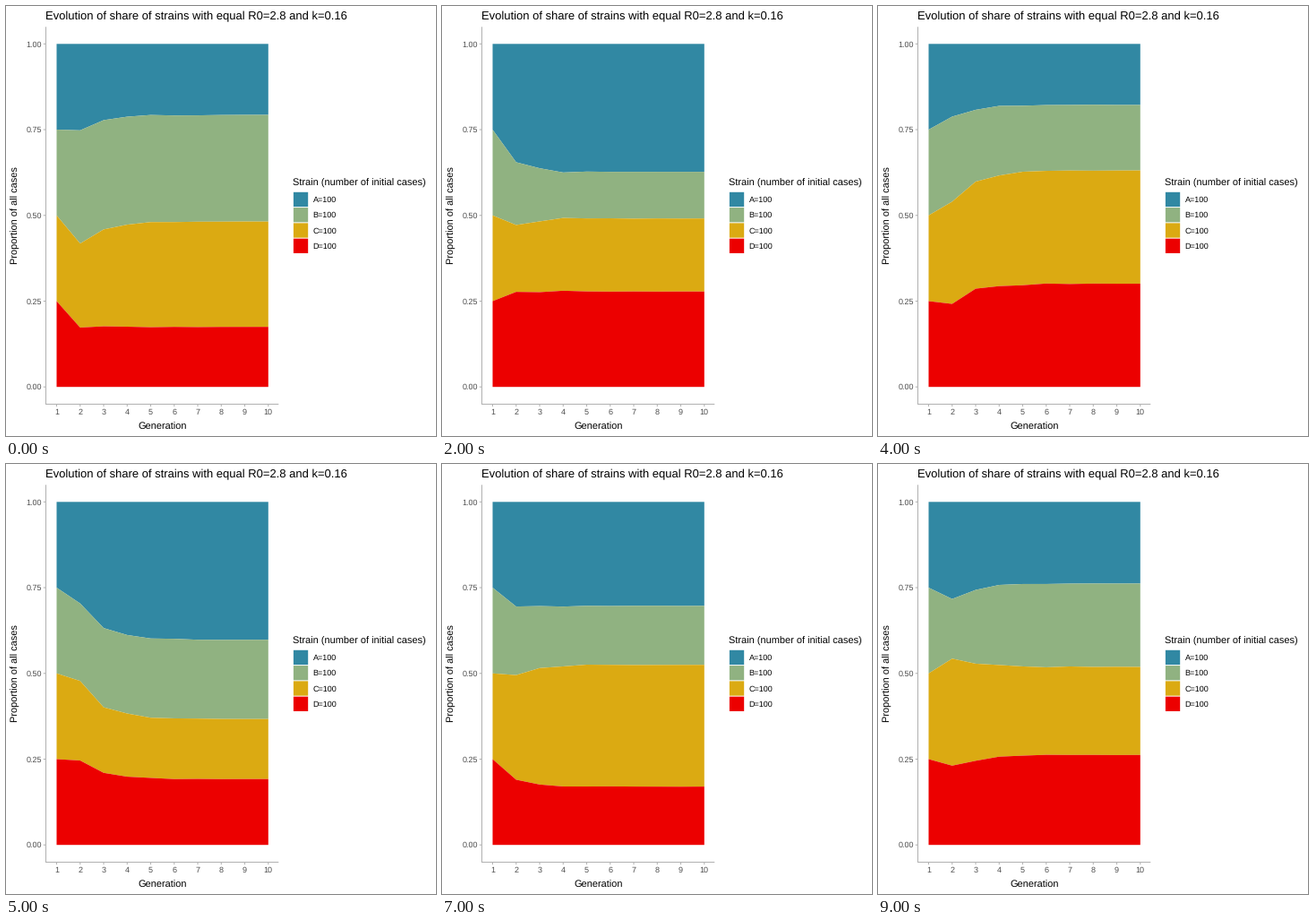
Write a matplotlib script that moves like this. It is 480x480 px and loops after 10 s.

```python
import numpy as np
import matplotlib.pyplot as plt
from matplotlib.animation import FuncAnimation
from matplotlib.patches import Polygon, Rectangle

plt.rcParams["font.family"] = "Liberation Sans"
plt.rcParams["text.hinting"] = "none"
plt.rcParams["text.hinting_factor"] = 1

SIZE, DPI = 480, 100
PX = 72 / DPI
COLORS = ["#3188A3", "#90B281", "#DBAA12", "#EC0000"]
STRAINS = "ABCD"
GENS = np.arange(1, 11)
START = np.array([0.75, 0.50, 0.25])
DECAY, WOBBLE = 0.35, 0.006
KEY = 17.28

# Per run: the three band limits in generation 2, then where they settle
RUNS = [
    ((0.748, 0.418, 0.173), (0.793, 0.482, 0.175)),
    ((0.715, 0.490, 0.240), (0.705, 0.480, 0.232)),
    ((0.655, 0.472, 0.277), (0.627, 0.491, 0.278)),
    ((0.634, 0.446, 0.213), (0.680, 0.463, 0.187)),
    ((0.788, 0.540, 0.242), (0.822, 0.631, 0.301)),
    ((0.704, 0.478, 0.246), (0.598, 0.367, 0.192)),
    ((0.735, 0.505, 0.240), (0.771, 0.500, 0.230)),
    ((0.695, 0.495, 0.190), (0.697, 0.525, 0.170)),
    ((0.735, 0.505, 0.245), (0.722, 0.500, 0.235)),
    ((0.717, 0.543, 0.231), (0.762, 0.519, 0.262)),
]


def x_px(gen):
    return 56.5 + (gen - 1) * 236.3 / 9


def y_px(share):
    return 425.2 - 382.9 * share


def limits(run):
    """Shares jump once, then close in on their end with fading noise."""
    second, settled = np.array(RUNS[run])
    rng = np.random.default_rng(run)
    lines = [np.ones(3), START, second]
    for step in range(1, 9):
        noise = WOBBLE * 0.6 ** step * rng.standard_normal(3)
        lines.append(settled + (second - settled) * DECAY ** step + noise)
    inner = np.array(lines[1:]).T
    return [np.ones(10), *inner, np.zeros(10)]


fig = plt.figure(figsize=(SIZE / DPI, SIZE / DPI), dpi=DPI, facecolor="white")
ax = fig.add_axes([0, 0, 1, 1])
ax.set_xlim(0, SIZE)
ax.set_ylim(SIZE, 0)
ax.axis("off")


def label(x, y, text, size, color="black", **kw):
    ax.text(x, y, text, fontsize=size * PX, color=color, va="baseline", **kw)


def rule(xs, ys):
    ax.plot(xs, ys, color="#B3B3B3", lw=1.07 * PX, solid_capstyle="butt",
            snap=False)


bands = [ax.add_patch(Polygon([(0, 0)] * 3, fc=c, ec="none", lw=0))
         for c in COLORS]

rule([44.5, 44.5], [23.3, 445])
rule([44, 304.3], [444.5, 444.5])
for share in np.linspace(0, 1, 5):
    y = y_px(share)
    rule([41.8, 44.5], [y, y])
    label(39.7, y + 3.2, f"{share:.2f}", 8.8, "#4D4D4D", ha="right")
for gen in GENS:
    x = x_px(gen)
    rule([x, x], [444.5, 447.2])
    label(x, 456, str(gen), 8.8, "#4D4D4D", ha="center")

label(44.5, 15, "Evolution of share of strains with equal R0=2.8 and k=0.16", 13.4)
label(174.7, 473, "Generation", 11, ha="center")
label(13.8, 234, "Proportion of all cases", 11, ha="center",
      rotation=90, rotation_mode="anchor")

label(320.3, 201, "Strain (number of initial cases)", 11)
for i, (name, color) in enumerate(zip(STRAINS, COLORS)):
    top = 207.3 + KEY * i
    ax.add_patch(Rectangle((320.9, top + 0.5), KEY - 1, KEY - 1, fc=color,
                           ec="none", lw=0, snap=False))
    label(342.7, top + 11.8, f"{name}=100", 8.8)


def draw(run):
    edges = [y_px(line) for line in limits(run)]
    xs = x_px(GENS)
    for band, upper, lower in zip(bands, edges, edges[1:]):
        band.set_xy(np.column_stack([np.r_[xs, xs[::-1]],
                                     np.r_[upper, lower[::-1]]]))
    return bands


anim = FuncAnimation(fig, draw, frames=len(RUNS), interval=1000, repeat=True,
                     repeat_delay=0)
plt.show()
```
